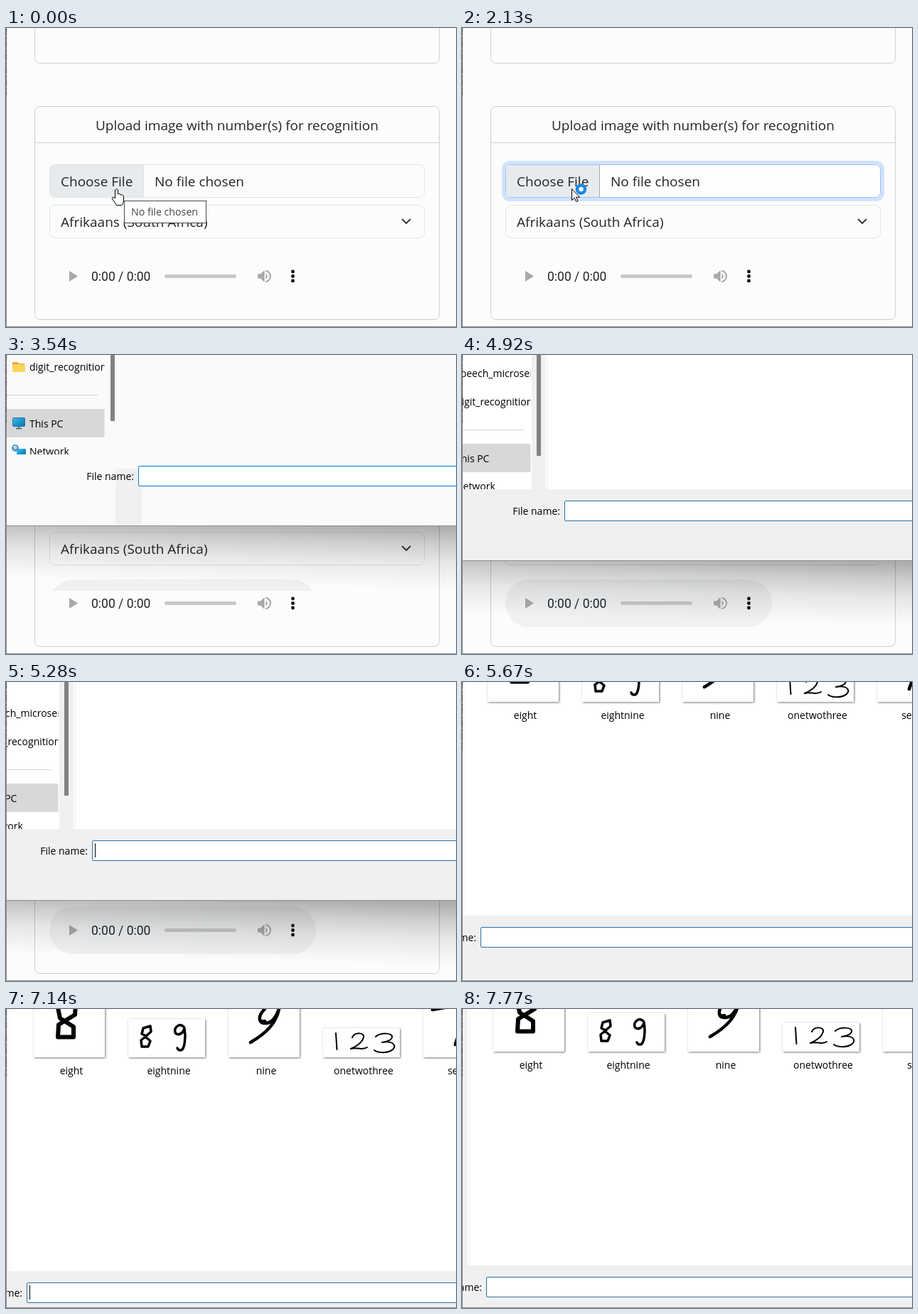
Write an HTML page that moves like this. It is 633 by 421 pixels and loops after 8 s.

```html
<!DOCTYPE html>
<html lang="en">
<head>
<meta charset="utf-8">
<title>Choosing a file</title>
<style>
  html, body { margin: 0; width: 100%; height: 100%; overflow: hidden; background: #fcfcfc; }
  svg { display: block; font: 19px "Open Sans", sans-serif; fill: #212529; }
  .line { fill: none; stroke: #cfcfcf; }
  .field { fill: #fcfcfc; stroke: #dee2e6; }
  .small { font-size: 14px; fill: #000; }
  .ink { fill: none; stroke: #000; stroke-linecap: round; stroke-linejoin: round; }
  .thumb { fill: #fff; filter: drop-shadow(1.5px 1.5px 1.5px #0008); }
  .cursor { fill: #fff; stroke: #000; stroke-linejoin: round; }
  #dialog { --body: #fff; --foot: #f0f0f0; --edge: #2a70a8; }
  #dialog.fresh { --body: #fafafa; --foot: #fafafa; --edge: #0078d4; }
  #dialog:not(.fresh) #patch { display: none; }
</style>
</head>
<body>
<svg width="633" height="421" viewBox="0 0 633 421">
  <defs>
    <linearGradient id="shade" gradientUnits="userSpaceOnUse" x1="300" y1="84" x2="297.500" y2="172">
      <stop offset="0" stop-opacity=".31"/>
      <stop offset=".25" stop-opacity=".19"/>
      <stop offset=".55" stop-opacity=".085"/>
      <stop offset="1" stop-opacity="0"/>
    </linearGradient>
    <linearGradient id="screen" x2="1" y2="1">
      <stop stop-color="#35c4e8"/><stop offset="1" stop-color="#0a6fb5"/>
    </linearGradient>
    <clipPath id="side"><rect x="-220" y="-500" width="172.500" height="484"/></clipPath>
    <path id="arrow" class="cursor" d="M.5.5V16.500L4.200 13 6.700 18.500 9 17.500 6.600 12.200H11.500Z"/>
  </defs>

  <rect width="633" height="421" fill="#fcfcfc"/>
  <rect class="line" x="40.500" y="-20" width="569" height="69.500" rx="7"/>
  <rect class="line" x="40.500" y="110.500" width="569" height="300" rx="7"/>
  <path class="line" d="M40 161.500H610"/>
  <text x="126" y="144">Upload image with number(s) for recognition</text>

  <rect class="field" x="61.500" y="192.500" width="527" height="46" rx="7"/>
  <g id="ring">
    <rect x="58.500" y="189.500" width="533" height="52" rx="9" fill="none" stroke="#c2dbfe" stroke-width="5"/>
    <rect x="61.500" y="192.500" width="527" height="46" rx="7" fill="#fff" stroke="#86b7fe"/>
  </g>
  <path fill="#e8ebed" d="M193 193V238H69Q62 238 62 231V200Q62 193 69 193Z"/>
  <path id="split" stroke="#dee2e6" d="M193.500 193V238"/>
  <text x="77" y="223">Choose File</text>
  <text x="209" y="223">No file chosen</text>

  <rect class="field" x="61.500" y="249.500" width="527" height="46" rx="7"/>
  <text x="77" y="280">Afrikaans (South Africa)</text>
  <path d="M557.500 269.500L563 275 568.500 269.500" fill="none" stroke="#343a40" stroke-width="2" stroke-linecap="round" stroke-linejoin="round"/>

  <svg width="633" height="421" id="pillView"><rect x="61" y="316" width="375" height="67" rx="33.500" fill="#eff1f2"/></svg>
  <g fill="#a8a8a8">
    <path d="M89 342V357L101 349.500Z"/>
    <rect x="223" y="347" width="101" height="5" rx="2.500" fill="#c8c8c8"/>
    <path d="M354 346.500H358L363.500 341V358L358 352.500H354Z"/>
    <path d="M365.500 345.500Q370 349.500 365.500 353.500Z"/>
    <path d="M365.500 341.500Q372 344 372 349.500T365.500 357.500" fill="none" stroke="#a8a8a8" stroke-width="2"/>
  </g>
  <text x="120" y="356" font-family="Roboto, sans-serif" font-size="17.500">0:00 / 0:00</text>
  <g fill="#000"><circle cx="403.500" cy="343" r="2.400"/><circle cx="403.500" cy="349.500" r="2.400"/><circle cx="403.500" cy="356" r="2.400"/></g>

  <g id="tip">
    <rect x="166.500" y="243.500" width="115" height="31" fill="#fff" stroke="#4a4a4a"/>
    <text x="176" y="264" font-size="14.200" fill="#444">No file chosen</text>
  </g>

  <!-- Dialog coordinates start at the corner of the file name box -->
  <g id="dialog" class="small">
    <rect x="-200" y="84" width="900" height="90" fill="url(#shade)"/>
    <rect x="-200" y="-500" width="900" height="484" fill="var(--body)"/>
    <rect x="-200" y="-16" width="900" height="100" fill="var(--foot)"/>
    <path stroke="#8f8f8f" d="M-200 84.500H700"/>
    <rect id="patch" x="-32" y="4" width="37" height="80" fill="#f0f0f0"/>
    <rect x="-46" y="-500" width="20" height="484" fill="var(--foot)"/>
    <path stroke="var(--foot)" d="M-23.500-500V-16"/>
    <rect x="-39" y="-500" width="6" height="437" fill="#828282"/>
    <g clip-path="url(#side)">
      <path stroke="#d4d4d4" d="M-200-99.500H-57"/>
      <rect x="-200" y="-80" width="153" height="40" rx="2" fill="#d8d8d8"/>
      <g id="folder"><path fill="#e9a827" d="M-177-146H-170L-168-144H-160V-136H-177Z"/><rect x="-177" y="-143" width="18" height="11" rx="1.500" fill="#ffd45e"/></g>
      <use href="#folder" y="-40"/>
      <rect x="-176.500" y="-67.500" width="17" height="12" rx="1" fill="url(#screen)" stroke="#2c6f92"/>
      <path stroke="#3d5c6c" stroke-width="1.500" d="M-168-55V-52M-172-52.500H-164"/>
      <rect x="-171" y="-24" width="13" height="10" fill="url(#screen)"/>
      <circle cx="-173" cy="-25" r="5" fill="#4f9bc4"/><path d="M-176-27q3-3 5 0t-3 4" fill="#b9e0f0"/>
      <text x="-153" y="-174">speech_microservice</text>
      <text x="-153" y="-134">digit_recognition</text>
      <text x="-153" y="-54">This PC</text>
      <text x="-153" y="-15">Network</text>
    </g>
    <g id="files" text-anchor="middle"></g>
    <g class="ink" transform="translate(-23 -383)">
      <path stroke-width="6" d="M91 6L78 14 68 20 67 37.500H89V23L70 11 67-4 74-18H88L92-8 91 6"/>
      <path stroke-width="3.500" d="M197 22L187 25 185 33 191 36 198 30 197 22M190 37L184 42 185 51H194L197 43 190 37M244 23C238 17 230 24 232 31C234 36 243 34 245 25C247 36 246 57 239 56Q236 56 235 53"/>
      <path stroke-width="4.500" d="M358-2C347 9 350 18 358 15M351 13C352 20 361 18 364 17C370 15 375 6 378-2C374 17 362 31 338 45M594-1L640-9C641 12 632 29 626 48"/>
      <path stroke-width="2" d="M458 32L459.500 55M481 38C485 30 499 31 497 38C495 46 486 51 479 54C488 51 494 57 502 52M514 37C521 31 539 31 537 38C535 44 526 44 523 45C541 42 545 52 535 57C527 61 516 59 512 56"/>
    </g>
    <text x="-6" y="20" text-anchor="end">File name:</text>
    <rect x=".5" y=".5" width="700" height="28" rx="1.500" fill="#fff" stroke="var(--edge)"/>
    <path id="caret" stroke="#000" d="M4.500 4V24"/>
  </g>

  <path id="hand" class="cursor" d="M153.500 240V228Q155.500 225 157.500 228V234Q159.500 232 161 235Q163 233.500 164 236Q165.500 235.500 165.500 238V243Q165 247 163 249.500H155.500Q153 245 149.500 241Q149 237.500 152 238.500Z"/>
  <g id="pointer"><use href="#arrow"/><circle id="busy" cx="13.500" cy="1" r="5.500" fill="#fff" stroke="#1b87e0" stroke-width="4.500"/></g>
  <path stroke="#8c8c8c" d="M.5 0V421M0 420.500H633"/>
  <path stroke="#555" stroke-dasharray="9 4 3 2" d="M.5 0V95"/>
</svg>
<script>
const $ = id => document.getElementById(id);
const show = (id, opacity) => $(id).setAttribute('opacity', +opacity);
const move = (id, x, y) => $(id).setAttribute('transform', `translate(${x} ${y})`);

// [name, left, width, height]
$('files').innerHTML = [
  ['eight', 10, 100, 100], ['eightnine', 143, 108, 54], ['nine', 284, 100, 100],
  ['onetwothree', 417, 108, 41], ['seven', 558, 100, 100]
].map(([name, x, w, h]) =>
  `<rect class="thumb" x="${x}" y="${-317 - h}" width="${w}" height="${h}"/>
   <text x="${x + w / 2 + 3}" y="-293">${name}</text>`).join('');

// Each list holds [start time, ...values]; values stay until the next entry
const ring = [[0, 0], [150, .4], [280, .8], [410, 1], [2130, .75], [2260, 0]];
const tip = [[0, 1], [150, .5], [280, 0]];
const fade = [[0, 0], [2400, .4], [2530, .85], [2650, 1]];
const pointer = [[0, 154, 226], [2650, 162, 214], [2770, 170, 202], [2890, 175, 194]];
const drag = [
  [0, 186, 156], [4920, 144, 205], [5040, 136, 211], [5160, 129, 216], [5280, 121, 223],
  [5430, 100, 252], [5550, 61, 302], [5670, 26, 345], [5790, 17, 362], [5910, 14, 373],
  [6030, 16, 380], [6150, 20, 384], [6400, 23, 383], [6520, 25, 385], [6640, 27, 386],
  [7140, 29, 385], [7280, 30, 384], [7530, 32, 381], [7650, 33, 379], [7770, 34, 377]
];
const at = (list, t) => list.findLast(key => key[0] <= t).slice(1);

function draw(now) {
  const t = now % 8000;
  show('ring', at(ring, t));
  $('split').setAttribute('stroke', t >= 150 && t < 2260 ? '#a6a9ac' : '#dee2e6');
  show('tip', at(tip, t));
  show('hand', t < 2130);
  show('pointer', t >= 2130 && t < 3030);
  show('busy', t < 2650);
  move('pointer', ...at(pointer, t));

  show('pillView', t >= 2890);
  $('pillView').setAttribute('height', t < 4920 ? 332 : 421);
  show('dialog', at(fade, t));
  move('dialog', ...at(drag, t));
  $('dialog').classList.toggle('fresh', t < 4920);
  show('caret', t >= 2890 && Math.floor(Math.max(0, t - 3035) / 505) % 2 === 0);
  requestAnimationFrame(draw);
}
requestAnimationFrame(draw);
</script>
</body>
</html>
```
